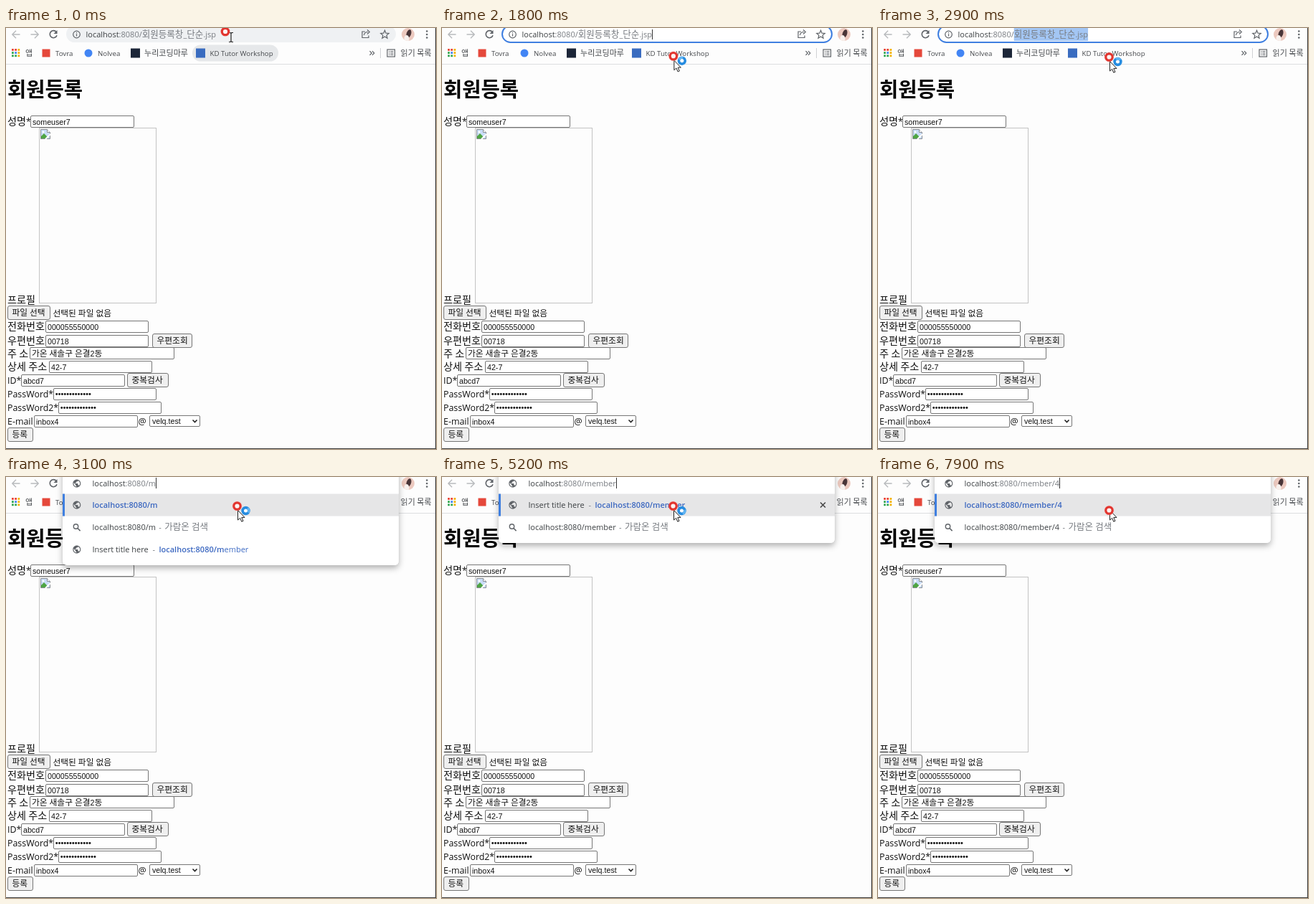
Write an HTML page that moves like this. It is 600 px wide and 587 px high and loops after 8 s.

```html
<!DOCTYPE html>
<html lang="ko">
<head>
<meta charset="utf-8">
<title>회원등록</title>
<style>
  html, body { margin: 0; width: 100%; height: 100%; overflow: hidden; background: #fdfdfd; }
  svg { display: block; width: 100vw; height: 100vh; }
  text { white-space: pre; font-family: "Open Sans", "Noto Sans CJK KR", sans-serif; }
  .field { font-family: "Liberation Sans", "Noto Sans CJK KR", sans-serif; }
  .bold { font-weight: 700; }
  .match { font-weight: 600; fill: #3b67c0; }
  .link { fill: #3f6cc4; }
  .dim { fill: #777b80; }
</style>
</head>
<body>
<svg viewBox="0 0 600 587" xmlns="http://www.w3.org/2000/svg">
  <defs>
    <filter id="shadow" x="-10%" y="-20%" width="120%" height="150%">
      <feDropShadow dx="0" dy="4" stdDeviation="4" flood-color="#000" flood-opacity=".3"/>
    </filter>
    <clipPath id="face"><circle cx="561" cy="9" r="9"/></clipPath>
  </defs>
  <g id="page"></g>
  <g id="toolbar"></g>
  <g id="address"></g>
  <g id="panel"></g>
  <g id="frame"></g>
  <g id="pointer"></g>
</svg>
<script>
const LOOP = 8000;
const HOST = 'localhost', PORT = ':8080/';
const FILE = '회원등록창_단순.jsp';
const PAGE = 'member';
const URL_SIZE = 11;
const INK = '#5f6368';
const $ = id => document.getElementById(id);

// Hangul runs are set a little larger than the Latin beside them.
const runs = (s, size, k = 1.14) =>
  s.replace(/[가-힣]+/g, m => `<tspan font-size="${(size * k).toFixed(2)}">${m}</tspan>`);
const text = (x, y, s, size, fill = '#111', cls = '', k) =>
  `<text x="${x}" y="${y}" font-size="${size}" fill="${fill}" class="${cls}">${runs(s, size, k)}</text>`;
const rect = (x, y, w, h, fill, extra = '') =>
  `<rect x="${x}" y="${y}" width="${w}" height="${h}" fill="${fill}" ${extra}/>`;
const circle = (x, y, r, fill, extra = '') =>
  `<circle cx="${x}" cy="${y}" r="${r}" fill="${fill}" ${extra}/>`;
const line = (d, color = INK, w = 1.4, extra = '') =>
  `<path d="${d}" fill="none" stroke="${color}" stroke-width="${w}" ${extra}/>`;
const span = (s, cls, extra = '') => `<tspan class="${cls}" ${extra}>${s}</tspan>`;

// Form
const label = (y, s) => text(2, y, s, 12.4);
const fieldText = (x, y, s) => text(x, y, s, 10.67, '#111', 'field', 1.1);
const box = (x, y, w, h, fill, r) =>
  rect(x + .5, y + .5, w - 1, h - 1, fill, `rx="${r}" stroke="#767676"`);
const input = (x, y, w, value) => box(x, y, w, 17, '#fff', 1.5) + fieldText(x + 3, y + 12.6, value);
const button = (x, y, w, s) => box(x, y, w, 20, '#efefef', 2.5) + fieldText(x + 6.5, y + 14.4, s);
const secret = (x, y) => box(x, y, 144, 17, '#fff', 1.5) +
  Array.from({ length: 13 }, (_, i) => circle(x + 4.7 + i * 3.85, y + 8.5, 1.45, '#111')).join('');

function brokenImage() {
  return rect(46.5, 139.5, 163, 244, 'none', 'stroke="#c3c3c3"') +
    '<path d="M48.5 141.5h9l4 4v9h-13z" fill="#c9dcf7" stroke="#8b8f94"/>' +
    '<path d="M57.5 141.5v4h4" fill="#fff" stroke="#8b8f94"/>' +
    '<path d="M49 154v-3l4 -4 4 4v3z" fill="#4fa544"/>' +
    circle(52, 145, 1.4, '#fff') + line('M55 155l7 -7', '#fff', 2);
}

$('page').innerHTML =
  rect(0, 0, 600, 587, '#fdfdfd') +
  text(2, 95.5, '회원등록', 25, '#000', 'bold') +
  label(134.5, '성명*') + input(34, 122, 145, 'someuser7') +
  brokenImage() + label(383.5, '프로필') +
  button(2, 387, 60, '파일 선택') + fieldText(65.5, 401.5, '선택된 파일 없음') +
  label(421, '전화번호') + input(55, 408, 144, '000055550000') +
  label(441, '우편번호') + input(55, 428, 144, '00718') + button(204, 426, 56, '우편조회') +
  label(459, '주 소') + input(33, 445, 202, '가온 새솔구 은결2동') +
  label(476.5, '상세 주소') + input(60, 464, 144, '42-7') +
  label(496, 'ID*') + input(21, 483, 145, 'abcd7') + button(169, 481, 58, '중복검사') +
  label(514.5, 'PassWord*') + secret(66, 502) +
  label(533.5, 'PassWord2*') + secret(73, 521) +
  label(552.5, 'E-mail') + input(39, 540, 145, 'inbox4') + text(184.5, 552.5, '@', 12.4) +
  box(200, 540, 71, 16, '#fff', 1.5) + fieldText(204, 552, 'velq.test') +
  line('M260.5 546.5l3 3 3 -3', '#222', 1.6) +
  button(2, 557, 36, '등록');

// Browser chrome
const GLOBE = 'M12 2C6.48 2 2 6.48 2 12s4.48 10 10 10 10-4.48 10-10S17.52 2 12 2zm-1 17.93c-3.95-.49-7-3.85-7-7.93 0-.62.08-1.21.21-1.79L9 15v1c0 1.1.9 2 2 2zm6.9-2.54c-.26-.81-1-1.39-1.9-1.39h-1v-3c0-.55-.45-1-1-1H8v-2h2c.55 0 1-.45 1-1V7h2c1.1 0 2-.9 2-2v-.41c2.93 1.19 5 4.06 5 7.41 0 2.08-.8 3.97-2.1 5.39z';
const globe = y => `<path d="${GLOBE}" fill="${INK}" transform="translate(92.2 ${y - 6.6}) scale(.55)"/>`;
const lens = y => circle(97.5, y - 1, 3.2, 'none', `stroke="${INK}" stroke-width="1.4"`) +
  line(`M99.8 ${y + 1.3}l3.8 3.8`, INK, 1.6);

function star(cx, cy) {
  const pts = Array.from({ length: 10 }, (_, i) => {
    const a = i * Math.PI / 5 - Math.PI / 2, r = i % 2 ? 2.7 : 6;
    return `${(cx + r * Math.cos(a)).toFixed(2)},${(cy + r * Math.sin(a)).toFixed(2)}`;
  });
  return `<polygon points="${pts.join(' ')}" fill="none" stroke="${INK}" stroke-width="1.2"/>`;
}

function apps() {
  const hues = ['#ea4335', '#ea4335', '#f5b400', '#34a853', '#4285f4', '#f5b400', '#34a853', '#34a853', '#f5b400'];
  return hues.map((c, i) => rect(8 + i % 3 * 4.2, 29 + Math.floor(i / 3) * 4.2, 2.8, 2.8, c)).join('');
}

const mark = (x, s) => text(x, 38.5, s, 9.7, '#45484c');

$('toolbar').innerHTML =
  rect(0, 0, 600, 50, '#fdfdfd') + rect(0, 50, 600, 1, '#dcdee0') +
  line('M19.5 9h-10.5M14 3.8l-5.2 5.2 5.2 5.2', '#b8babd') +
  line('M34.5 9h10.5M40 3.8l5.2 5.2 -5.2 5.2', '#b8babd') +
  line('M70.2 5.6a5 5 0 1 0 .8 4.6', INK, 1.6) + '<path d="M71.5 3v5h-5z" fill="#5f6368"/>' +
  rect(260, 23.5, 120, 23, '#e6e8ea', 'rx="11.5" id="hover"') +
  apps() + mark(27, '앱') +
  rect(50.5, 29.5, 11, 11, '#e5483b') + mark(69, 'Tovra') +
  circle(115, 35, 5.5, '#4285f4') + mark(128, 'Nolvea') +
  rect(174, 28.5, 13, 13, '#1c2638') + mark(193, '누리코딩마루') +
  rect(265, 28.5, 13, 13, '#3a6cc0') + mark(284.5, 'KD Tutor Workshop') +
  line('M507.5 32.2l2.8 2.8 -2.8 2.8M511 32.2l2.8 2.8 -2.8 2.8', INK, 1.2) +
  rect(522, 28, 1, 14, '#d0d2d5') +
  rect(532, 30, 10.5, 10, 'none', `stroke="${INK}" stroke-width="1.2"`) +
  line('M534 32.7h1.4m1 0h4.2M534 35h1.4m1 0h4.2M534 37.3h1.4m1 0h4.2', INK, 1) +
  mark(550.5, '읽기 목록') +
  circle(561, 9, 9, '#ecc9bf') +
  '<g clip-path="url(#face)"><ellipse cx="562" cy="8" rx="3.2" ry="6" fill="#493538" transform="rotate(18 562 8)"/>' +
  '<ellipse cx="559" cy="15" rx="3.5" ry="5" fill="#f8f1ee"/></g>' +
  [4.5, 9, 13.5].map(y => circle(587.3, y, 1.3, INK)).join('');

$('address').innerHTML =
  rect(84, -3, 460, 23, '#eff1f3', 'rx="11.5" id="pill"') +
  rect(0, 0, 0, 18, '#a3c6f4', 'id="mark"') +
  circle(98.5, 9, 4.8, 'none', `stroke="${INK}" stroke-width="1.2"`) +
  line('M98.5 8.3v3.2M98.5 6v1.3', INK, 1.2) +
  `<text id="url" x="111.5" y="13" font-size="${URL_SIZE}" fill="#3c4043">${HOST}${span(PORT + runs(FILE, URL_SIZE), 'dim')}</text>` +
  rect(292, 2, 1, 14, '#333', 'id="caret"') +
  line('M501 5h-4v8.5h9v-3M499.5 10c.5 -3.3 2.5 -4.5 5.5 -4.5M504 2.5l3.3 3 -3.3 3', INK, 1.2) +
  star(528.5, 9.3);

$('frame').innerHTML = rect(599, 0, 1, 587, '#3a3a3a') + rect(0, 586, 600, 1, '#3a3a3a');

// Suggestions
const row = (y, icon, body) =>
  icon(y) + `<text x="120.5" y="${y + 4}" font-size="${URL_SIZE}" fill="#3c4043">${body}</text>`;
const titled = tail => 'Insert title here' + span('-', 'dim', 'x="204.5"') + tail;

function drawPanel(typed) {
  const path = HOST + PORT + typed, exact = typed === PAGE;
  const more = !exact && PAGE.startsWith(typed);
  const bottom = more ? 123 : 92;
  const search = path + span('-', 'dim', 'dx="4.3"') +
    span('가람온 검색', 'dim', 'dx="4.5" font-size="12.5"');
  const first = exact ? titled(span(path, 'match', 'x="213.5"')) : span(path, 'match');
  $('panel').innerHTML =
    rect(79, -12, 469, bottom + 12, '#fff', 'rx="6" filter="url(#shadow)"') +
    rect(79, 23.5, 469, 31, '#e6e6e7') + rect(79, 23.5, 3, 31, '#3f7fe0') +
    globe(9) +
    `<text id="typed" x="120.5" y="13" font-size="${URL_SIZE}" fill="#3c4043">${HOST}${span(PORT + typed, 'dim')}</text>` +
    row(39, globe, first) + row(70, lens, search) +
    (more ? row(101, globe, titled(span(path, 'match', 'x="213.5"') +
      span(PAGE.slice(typed.length), 'link'))) : '') +
    (exact ? line('M528 35.5l7 7m0 -7l-7 7', '#444', 1.5) : '') +
    rect(0, 1, 1, 15, '#333', 'id="bar"');
  const end = $('typed').getComputedTextLength();
  $('bar').setAttribute('x', Math.round(120.5 + end));
}

// Pointer
$('pointer').innerHTML =
  '<g id="beam">' + line('M-3 -6.5h2l1 1 1 -1h2M0 -5.5v11M-3 6.5h2l1 -1 1 1h2', '#222', 1.2) + '</g>' +
  '<g id="arrow"><path d="M0 0v13.5l3.1 -2.8 2.2 5 2.2 -1 -2.2 -4.8h4.2z" fill="#fff" stroke="#222"/></g>' +
  '<g id="busy">' + circle(0, 0, 4.4, '#fff', 'stroke="#268ce0" stroke-width="3.6"') +
  '<path id="spin" d="M0 -4.4a4.4 4.4 0 0 1 4.4 4.4" fill="none" stroke="#62b5f2" stroke-width="3"/></g>' +
  '<g id="ring">' + circle(0, 0, 7, '#f6b9b6', 'opacity=".45"') +
  circle(0, 0, 4.7, '#fdf4f3', 'stroke="#e2352f" stroke-width="3.2"') + '</g>';

const KEYS = [[3000, 'm'], [3300, 'me'], [3550, 'mem'], [3800, 'memb'], [4000, 'membe'],
  [4200, 'member'], [6000, 'member/'], [7500, 'member/4']];
const CLICK = 500, SELECT = 2100, IDLE = 7400;

const clamp = v => Math.min(1, Math.max(0, v));
const ease = v => v * v * (3 - 2 * v);
const mix = (a, b, v) => a + (b - a) * v;
const show = (id, on) => $(id).setAttribute('visibility', on ? 'visible' : 'hidden');
const place = (id, x, y) => $(id).setAttribute('transform', `translate(${x.toFixed(2)} ${y.toFixed(2)})`);

function drawPointer(t) {
  const a = ease(clamp((t - 100) / 500)), b = ease(clamp((t - 1200) / 700));
  const x = mix(mix(314, 330, a), 323.5, b), y = mix(mix(13, 22.5, a), 46.5, b);
  const beam = t < CLICK, busy = !beam && t < IDLE;
  show('beam', beam);
  show('arrow', !beam);
  show('busy', busy);
  place('beam', x, y);
  place('arrow', x, y);
  place('busy', x + 11, y + .5);
  place('ring', x - (beam ? 8 : 1), y - (beam ? 8 : busy ? 6 : 0));
  $('spin').setAttribute('transform', `rotate(${t * .36 % 360})`);
}

function drawAddress(t) {
  const focused = t >= CLICK, pill = $('pill');
  pill.setAttribute('fill', focused ? '#fff' : '#eff1f3');
  pill.setAttribute('stroke', focused ? '#3f7fe0' : 'none');
  pill.setAttribute('stroke-width', 2);
  $('hover').setAttribute('opacity', 1 - clamp((t - 100) / 200));

  const url = $('url'), len = url.getNumberOfChars();
  const end = url.getEndPositionOfChar(len - 1).x;
  const count = Math.min(FILE.length, Math.max(0, Math.floor((t - SELECT) / 36)));
  const start = count ? url.getStartPositionOfChar(len - count).x : end;
  $('mark').setAttribute('x', start);
  $('mark').setAttribute('width', end - start);
  $('caret').setAttribute('x', Math.round(end));
  show('caret', focused && !count && (t - CLICK) % 1000 < 500);
}

let shown = null;
function render(t) {
  const key = KEYS.filter(k => k[0] <= t).pop();
  const typed = key ? key[1] : '';
  if (typed !== shown) {
    if (key) drawPanel(typed); else $('panel').innerHTML = '';
    shown = typed;
  }
  if (key) show('bar', (t - key[0]) % 1000 < 500);
  drawAddress(t);
  drawPointer(t);
}

function tick() {
  render(performance.now() % LOOP);
  requestAnimationFrame(tick);
}
tick();
</script>
</body>
</html>
```
